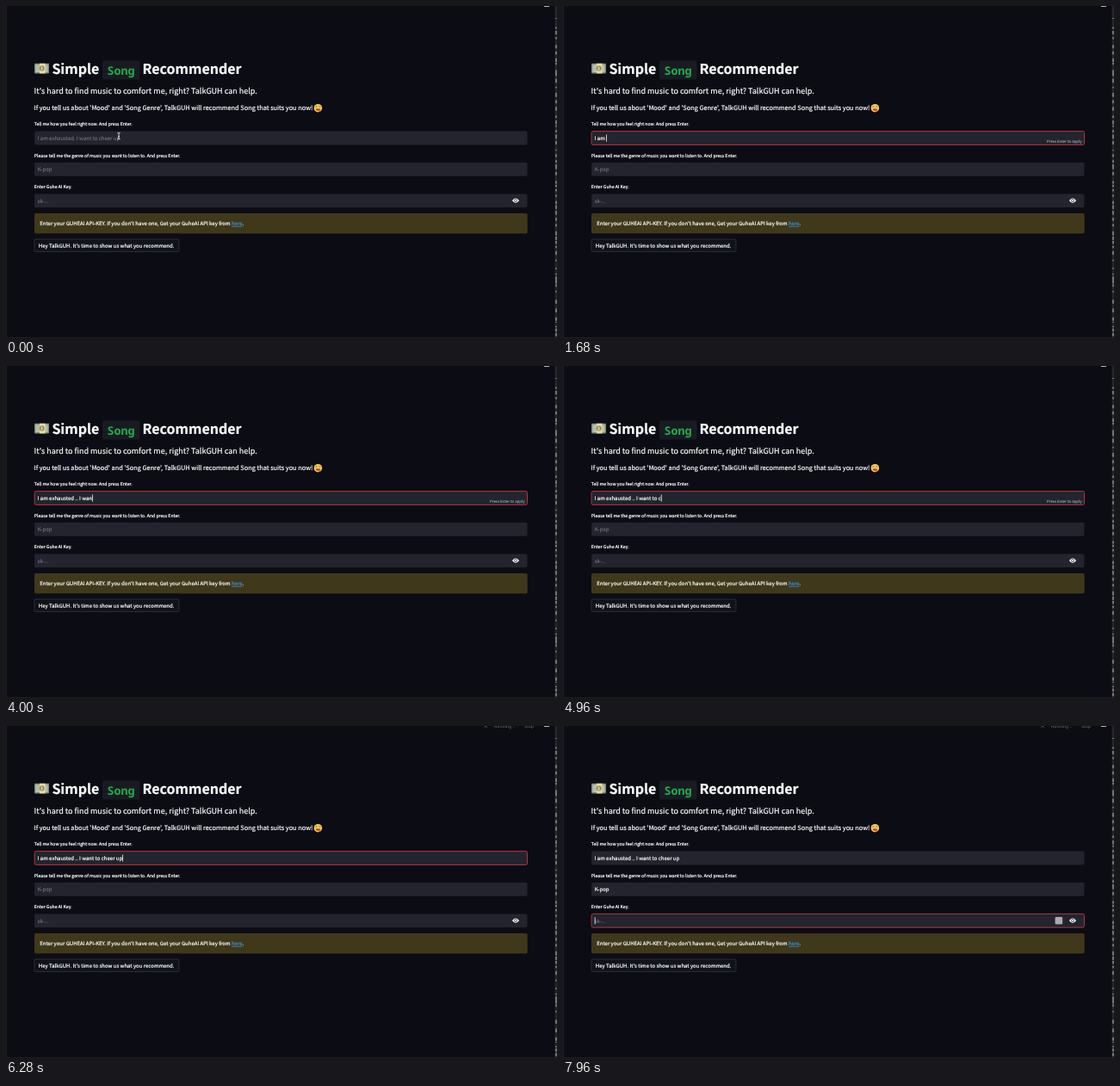
Animation of 640x386 px, one loop 8000 ms. Source, as an HTML page:

```html
<!DOCTYPE html>
<html lang="en">
<head>
<meta charset="utf-8">
<title>Simple Song Recommender</title>
<style>
  html, body { margin: 0; width: 100%; height: 100%; overflow: hidden; background: #0b0c14; }
  svg { display: block; width: 100vw; height: 100vh; }
  text, tspan { --ink: #fff; fill: var(--ink); stroke: var(--ink); }
  text {
    font-family: "Noto Sans CJK JP", "Noto Sans CJK SC", "Noto Sans CJK", "Noto Sans", sans-serif;
    font-size: 6.02px;
    stroke-width: .2px;
    white-space: pre;
    text-rendering: geometricPrecision;
  }
  .title { font-size: 16px; font-weight: 700; }
  .code { --ink: #20b04b; font-family: "Noto Sans Mono", "DejaVu Sans Mono", monospace; font-size: 13.3px; font-weight: 600; stroke: none; }
  .lead { font-size: 9.03px; }
  .sub { font-size: 7.36px; }
  .label { font-size: 5.17px; }
  .hint { --ink: #a3a4aa; font-size: 4.4px; text-anchor: end; stroke-width: .1px; }
  .ghost { --ink: #73747c; stroke-width: .1px; }
  .link { --ink: #3d8ed2; text-decoration: underline; }
  .box { fill: #23242d; }
  .ring { fill: none; stroke: #c5383e; stroke-width: .9; }
  .status text { --ink: #75767c; font-size: 5.17px; stroke: none; }
</style>
</head>
<body>
<svg viewBox="0 0 640 386" preserveAspectRatio="none">
  <rect width="640" height="386" fill="#0b0c14"/>
  <path d="M.5 0V386M0 385.5H640" stroke="#1b1d24" fill="none"/>
  <rect x="637.5" width="2.5" height="386" fill="#24262b"/>
  <path id="edge" stroke="#85878a" stroke-width="1.6"/>
  <path d="M625 .4H631" stroke="#e4e4e6" stroke-width=".9"/>

  <g id="status" class="status">
    <path d="M555.5 1.8L557 0L559 1.8" stroke="#75767c" stroke-width=".7" fill="none"/>
    <text x="567" y="1.6">Running...</text>
    <text x="602" y="1.6">Stop</text>
  </g>

  <!-- banknote -->
  <g>
    <rect x="33" y="66.8" width="17" height="11.6" rx=".8" fill="#7f8a7c"/>
    <rect x="34.4" y="68.2" width="14.2" height="8.8" fill="#b9bfaa"/>
    <rect x="39" y="66.8" width="6.6" height="11.6" fill="#ecd79a"/>
    <circle cx="41.6" cy="72.6" r="3" fill="#8b8a66"/>
    <path d="M41.6 70.6V74.6M40.4 71.8H42.8M40.4 73.6H42.8" stroke="#f3ebc8" stroke-width=".7"/>
  </g>
  <text class="title" x="53.4" y="79.2">Simple</text>
  <rect x="112" y="63.5" width="43.5" height="22" rx="2" fill="#191b23"/>
  <text class="code" x="117.6" y="79.7">Song</text>
  <text class="title" x="158.6" y="79.2">Recommender</text>

  <text class="lead" x="32.6" y="101.6">It's hard to find music to comfort me, right? TalkGUH can help.</text>
  <text class="sub" x="32.6" y="121.1">If you tell us about 'Mood' and 'Song Genre', TalkGUH will recommend Song that suits you now!</text>

  <!-- smiling face -->
  <g>
    <circle cx="362.4" cy="118.7" r="4.8" fill="#f8cb52"/>
    <path d="M359.3 117.3q1 -1.4 2 0M363.5 117.3q1 -1.4 2 0" stroke="#5b3a17" stroke-width=".7" fill="none"/>
    <path d="M359.6 119.5h5.6q-.5 2.4 -2.8 2.4t-2.8 -2.4z" fill="#8a4a22"/>
    <ellipse cx="364" cy="121.6" rx="1.6" ry="1.4" fill="#e2545a"/>
  </g>

  <g id="fields"></g>

  <rect id="helper" x="571.6" y="222" width="8.6" height="8.6" rx="1.4" fill="#a9abaf"/>
  <path d="M587.9 226.2q4.1 -5.4 8.2 0q-4.1 5.4 -8.2 0z" fill="#fafafa"/>
  <circle cx="592" cy="226.2" r="1.5" fill="#fafafa" stroke="#23242d" stroke-width=".7"/>

  <rect x="33" y="241" width="572.7" height="23.5" rx="1.8" fill="#3f381b"/>
  <text x="39.2" y="255">Enter your GUHEAI API-KEY. If you don't have one, Get your GuheAI API key from <tspan class="link">here</tspan>.</text>

  <rect x="32.9" y="271" width="168" height="14.6" rx="1.8" fill="#11131a" stroke="#3b3d45" stroke-width=".7"/>
  <text x="37.8" y="280.5">Hey TalkGUH. It's time to show us what you recommend.</text>

  <path id="pointer" d="M129.3 147.2q1.7 0 1.7 1.2q0 -1.2 1.7 -1.2M131 148.4V153.6M129.3 154.8q1.7 0 1.7 -1.2q0 1.2 1.7 1.2M130 151.6h2" fill="none" stroke="#e6e6e8" stroke-width=".9"/>
</svg>
<script>
const LOOP = 8000, FADE = 110, TEXT_X = 36.7;
const byId = id => document.getElementById(id);

// Each burst: first key time, last key time, characters.
const fields = [
  { y: 145.6, label: "Tell me how you feel right now. And press Enter.",
    ghost: "I am exhausted. I want to cheer up", focus: 280, blur: 6320, submit: 6200,
    bursts: [[1200, 1960, "I am exh"], [2160, 2520, "austed"], [2760, 3960, " .. I wan"],
             [4160, 4720, "t to "], [4960, 5300, "chee"], [5480, 5640, "r "], [5880, 6000, "up"]] },
  { y: 182, label: "Please tell me the genre of music you want to listen to. And press Enter.",
    ghost: "K-pop", focus: 6320, blur: 7840, submit: 7840,
    bursts: [[6640, 6640, "K"], [6960, 7180, "-po"], [7360, 7360, "p"]] },
  { y: 218.4, label: "Enter Guhe AI Key.",
    ghost: "sk-...", focus: 7840, blur: LOOP, submit: LOOP, bursts: [] }
];

for (const f of fields) {
  const g = document.createElementNS("http://www.w3.org/2000/svg", "g");
  const rect = cls => `<rect class="${cls}" x="33.1" y="${f.y}" width="572.4" height="15.8" rx="1.8"/>`;
  g.innerHTML = `<text class="label" x="32.8" y="${f.y - 6.5}">${f.label}</text>
    ${rect("box")}${rect("ring")}
    <text class="value" x="${TEXT_X}" y="${f.y + 10.1}"></text>
    <text class="hint" x="602.6" y="${f.y + 13.4}">Press Enter to apply</text>
    <rect class="caret" y="${f.y + 4}" width=".8" height="8" fill="#fafafa"/>`;
  byId("fields").append(g);
  for (const part of ["ring", "value", "hint", "caret"]) f[part] = g.querySelector("." + part);
  f.keys = f.bursts.flatMap(([from, to, chars]) =>
    [...chars].map((char, i) => ({ char, at: from + (to - from) * i / Math.max(1, chars.length - 1) })));
}

let seed = 7;
const random = () => (seed = seed * 16807 % 2147483647) / 2147483647;
let ticks = "";
for (let y = 14; y < 384; y += 3 + random() * 8) ticks += `M639 ${y.toFixed(1)}v${(1 + random() * 4).toFixed(1)}`;
byId("edge").setAttribute("d", ticks);

const clamp = v => Math.min(1, Math.max(0, v));
const show = (el, on) => el.style.visibility = on ? "visible" : "hidden";

function drawField(f, t) {
  const typed = f.keys.filter(k => k.at <= t);
  const text = typed.map(k => k.char).join("");
  const focused = t >= f.focus && t < f.blur;
  const lastAction = typed.length ? typed[typed.length - 1].at : f.focus;
  f.value.textContent = text || f.ghost;
  f.value.classList.toggle("ghost", !text);
  f.ring.style.opacity = clamp((t - f.focus) / FADE) * (1 - clamp((t - f.blur) / FADE));
  show(f.hint, text && t < f.submit);
  show(f.caret, focused && (t - lastAction) % 1000 < 500);
  f.caret.setAttribute("x", TEXT_X + (text ? f.value.getComputedTextLength() : 0));
}

function frame() {
  const t = performance.now() % LOOP;
  fields.forEach(f => drawField(f, t));
  show(byId("pointer"), t < 1200);
  show(byId("helper"), t >= 7840);
  show(byId("status"), (t >= 6240 && t < 6480) || t >= 7880);
  requestAnimationFrame(frame);
}
frame();
</script>
</body>
</html>
```
